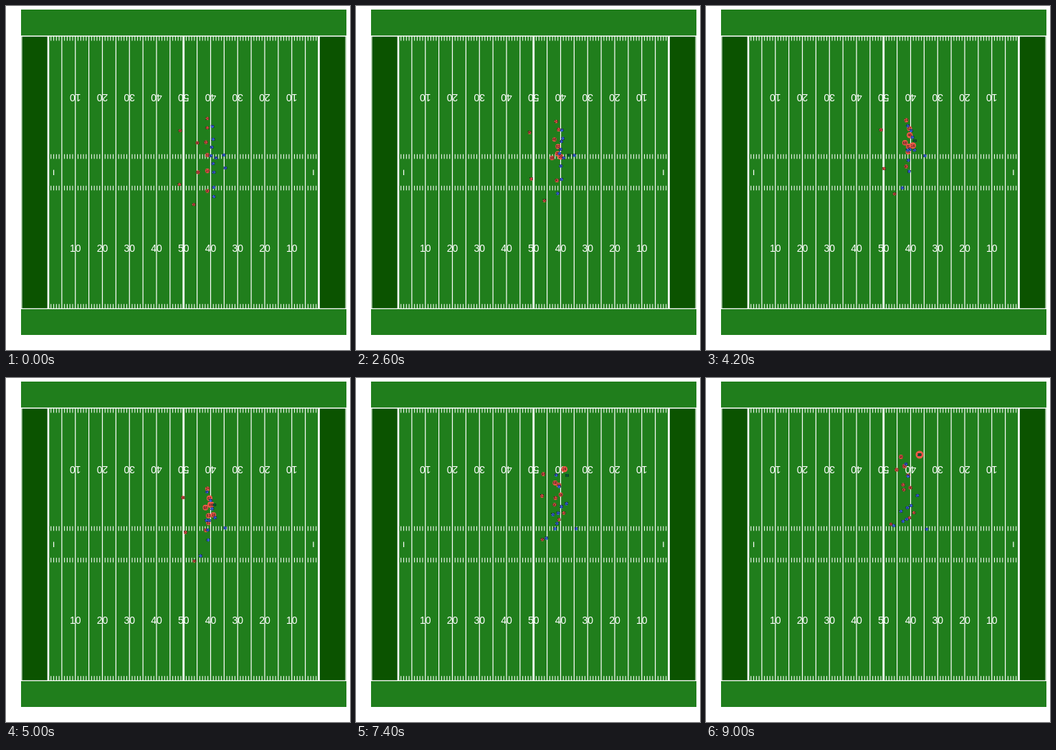
Write an HTML page that moves like this. It is 480 px wide and 480 px high and loops after 9200 ms.

```html
<!DOCTYPE html>
<html lang="en">
<head>
<meta charset="utf-8">
<title>Football play</title>
<style>
html, body { margin: 0; width: 100%; height: 100%; overflow: hidden; background: #fff; }
svg { display: block; width: 100vw; height: 100vh; }
text { font-family: "Liberation Sans", Arial, sans-serif; text-anchor: middle; }
.yards { font-size: 14px; fill: #fff; }
.jersey { font-size: 5px; fill: #140a14; }
</style>
</head>
<body>
<svg id="stage" viewBox="0 0 480 480"></svg>
<script>
const LOOP = 9200, STEP = 200, SNAP = 2000;
const GOAL = 59, YARD = 3.775, TOP = 42, BOTTOM = 422.3;
const GREEN = '#207e1c', DARK = '#0b5300', RED = '#ee5a48', BLUE = '#386cf4', CARRY = '#087a42';
const stage = document.getElementById('stage');

function add(tag, attrs, parent = stage) {
  const el = document.createElementNS('http://www.w3.org/2000/svg', tag);
  for (const k in attrs) el.setAttribute(k, attrs[k]);
  parent.appendChild(el);
  return el;
}
const rect = (x, y, width, height, fill) => add('rect', { x, y, width, height, fill });
const line = (x1, y1, x2, y2, w) =>
  add('line', { x1, y1, x2, y2, stroke: '#fff', 'stroke-width': w });

function drawField() {
  rect(21, 5, 454, 454, GREEN);
  rect(22, TOP, 36.5, BOTTOM - TOP, DARK);
  rect(437.5, TOP, 36.5, BOTTOM - TOP, DARK);
  for (const y of [TOP, BOTTOM]) line(21, y, 475, y, 1.3);
  for (const x of [21.9, 474.1]) line(x, TOP, x, BOTTOM, 1.2);

  for (let yd = 0; yd <= 100; yd++) {
    const x = GOAL + yd * YARD;
    if (yd % 5 === 0) {
      line(x, TOP, x, BOTTOM, yd === 50 ? 2.8 : yd % 100 ? 1.2 : 2.6);
    } else {
      for (const y of [TOP, 206.8, 250.8, BOTTOM - 6.5]) line(x, y, x, y + 6.5, 1);
    }
    if (yd === 2 || yd === 98) line(x, 228.6, x, 236, 1.2);
    if (yd % 10 === 0 && yd % 100) {
      const label = Math.min(yd, 100 - yd);
      add('text', { x, y: 343.3, class: 'yards' }).textContent = label;
      add('text', { y: 5, class: 'yards', transform: `translate(${x} 128) rotate(180)` }).textContent = label;
    }
  }
}

const players = [];
// Each run passes through its points at even intervals
function player(color, ...run) {
  const g = add('g', {});
  const dot = add('circle', { r: 2.3, fill: color }, g);
  const number = 10 + (14 + players.length * 37) % 89;
  add('text', { y: 1.8, class: 'jersey' }, g).textContent = number;
  const p = { color, run, g, dot };
  players.push(p);
  return p;
}

// Hermite curve from a standing start; u runs from 0 to 1
function along(run, axis, u) {
  const last = run.length - 1, at = i => run[i][axis];
  const slope = i => i === 0 ? 0
    : i === last ? at(i) - at(i - 1)
    : (at(i + 1) - at(i - 1)) / 2;
  const i = Math.min(last - 1, Math.floor(u * last));
  const s = u * last - i, n = 1 - s, w = s * s * (3 - 2 * s);
  return at(i) * (1 - w) + at(i + 1) * w + s * n * (n * slope(i) - s * slope(i + 1));
}

drawField();

const chaser = player(RED, [281, 157], [280, 158], [298, 107]);
player(RED, [281, 170], [284, 170], [282, 136]);
player(RED, [243, 174], [245, 171], [272, 110]);
player(RED, [267, 191], [285, 179], [285, 153]);
player(RED, [279, 190], [283, 195], [275, 149]);
player(RED, [281, 208], [284, 195]);
player(RED, [268, 232], [278, 187], [277, 123]);
player(RED, [281, 230], [289, 193], [290, 188]);
player(RED, [242, 249], [249, 223], [266, 128]);
player(RED, [281, 258], [276, 156]);
player(RED, [262, 277], [263, 260], [258, 204]);

player(BLUE, [288, 168], [286, 173], [282, 137]);
player(BLUE, [289, 186], [286, 178]);
player(BLUE, [287, 197], [284, 200], [281, 181]);
player(BLUE, [304, 208], [308, 211]);
player(BLUE, [293, 212], [281, 164], [279, 120]);
player(BLUE, [289, 220], [295, 164]);
player(BLUE, [290, 232], [282, 214], [280, 197]);
player(BLUE, [290, 253], [283, 229], [275, 200]);
player(BLUE, [290, 266], [273, 252], [262, 206]);
player(BLUE, [286, 209], [272, 186]);
const runner = player(BLUE, [306, 226], [291, 184], [298, 107]);

function draw(ms) {
  const t = Math.floor((ms % LOOP) / STEP) * STEP;
  for (const p of players) {
    p.x = along(p.run, 0, t / (LOOP - STEP));
    p.y = along(p.run, 1, t / (LOOP - STEP));
    p.g.setAttribute('transform', `translate(${p.x} ${p.y})`);
  }
  // Defenders swell as they close in on the runner
  for (const p of players.filter(q => q.color === RED)) {
    const d = Math.hypot(p.x - runner.x, p.y - runner.y);
    p.dot.setAttribute('r', 2.2 + 3.3 * Math.exp(-d / 20));
  }
  runner.dot.setAttribute('fill', t > SNAP ? CARRY : BLUE);
}

const start = performance.now();
function tick() {
  draw(performance.now() - start);
  requestAnimationFrame(tick);
}
draw(0);
requestAnimationFrame(tick);
</script>
</body>
</html>
```
